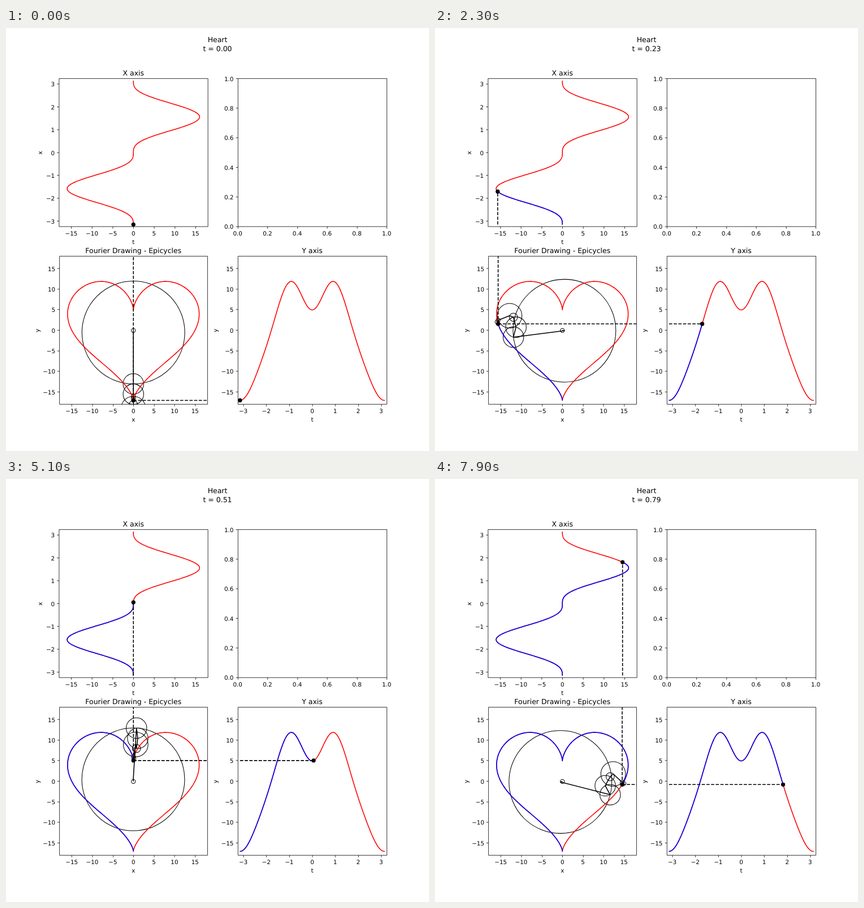
Recreate the animation shown at these times as an HTML page. Size 748 px wide and 748 px high, loop 8 s.

```html
<!DOCTYPE html>
<html lang="en">
<head>
<meta charset="utf-8">
<title>Heart epicycles</title>
<style>
  html, body { margin: 0; width: 100%; height: 100%; overflow: hidden; background: #fff; }
  svg { display: block; width: 100%; height: 100%; }
  text { font: 10.39px "DejaVu Sans", sans-serif; text-anchor: middle; text-rendering: geometricPrecision; }
  .title { font-size: 12.47px; }
  .right { text-anchor: end; }
  path, circle { fill: none; stroke: #000; }
  circle { stroke-width: 1.04; }
  .line { stroke-width: 1.56; stroke-linejoin: round; }
  .red { stroke: #f00; stroke-linecap: square; }
  .blue { stroke: #00f; }
  .dash { stroke-dasharray: 5.766 2.493; }
  .dot { fill: #000; }
  .frame { stroke-width: .8; }
</style>
</head>
<body>
<svg id="stage" viewBox="0 0 748 748"></svg>
<script>
const SIZE = 748, CELL = SIZE / 1000;
const TICK = 3.64, GAP = 7.27;
const LOOP = 8000, STEP = 100;
const PI = Math.PI, EDGE = PI + 0.1;
const stage = document.getElementById('stage');

// Amplitudes along the imaginary axis: [frequency, amplitude]
const terms = [[1, .5], [-1, 12.5], [2, -2.5], [-2, -2.5], [3, 1], [-3, -3], [4, -.5], [-4, -.5]];
const heartX = a => 16 * Math.sin(a) ** 3;
const heartY = a => 13 * Math.cos(a) - 5 * Math.cos(2 * a) - 2 * Math.cos(3 * a) - Math.cos(4 * a);

function add(parent, tag, attrs, content) {
  const el = document.createElementNS('http://www.w3.org/2000/svg', tag);
  for (const key in attrs) el.setAttribute(key, attrs[key]);
  if (content !== undefined) el.textContent = content;
  parent.appendChild(el);
  return el;
}

function label(x, y, content, cls = '') {
  return add(stage, 'text', { x, y, class: cls }, content);
}

// Hairlines sit on the centres of a 1000 cell grid
const snapX = x => (Math.round(x / CELL) + .5) * CELL;
const snapY = y => SIZE - snapX(SIZE - y);
const signed = v => String(v).replace('-', '\u2212');
const range = (from, to, step) =>
  Array.from({ length: Math.round((to - from) / step) + 1 }, (_, i) => from + i * step);

let panelCount = 0;
function makePanel({ left, top, width, height = 261.8, xMax, yMax, xMin = -xMax, yMin = -yMax,
                     xTicks, yTicks, format = signed, title, xName, yName, yNameAt }) {
  const right = left + width, bottom = top + height;
  const px = v => left + (v - xMin) / (xMax - xMin) * width;
  const py = v => bottom - (v - yMin) / (yMax - yMin) * height;

  const id = 'clip' + panelCount++;
  const clip = add(stage, 'clipPath', { id });
  add(clip, 'rect', { x: left, y: top, width, height });
  const plot = add(stage, 'g', { 'clip-path': `url(#${id})` });

  const l = snapX(left), r = snapX(right), t = snapY(top), b = snapY(bottom);
  let frame = `M${l} ${t}H${r}V${b}H${l}Z`;
  for (const v of xTicks) {
    frame += `M${snapX(px(v))} ${b}v${TICK}`;
    label(px(v), bottom + 15.7, format(v));
  }
  for (const v of yTicks) {
    frame += `M${l} ${snapY(py(v))}h${-TICK}`;
    label(left - GAP, py(v) + 3.9, format(v), 'right');
  }
  add(stage, 'path', { d: frame, class: 'frame' });

  if (title) {
    const cx = left + width / 2, cy = top + height / 2;
    label(cx, top - 6.2, title, 'title');
    label(cx, bottom + 30.1, xName);
    add(stage, 'text', { transform: `translate(${yNameAt} ${cy}) rotate(-90)` }, yName);
  }
  return { plot, px, py };
}

function trace(panel, fx, fy, end) {
  const n = Math.max(1, Math.ceil((end + PI) / (2 * PI) * 400));
  let d = '';
  for (let i = 0; i <= n; i++) {
    const a = -PI + (end + PI) * i / n;
    d += (i ? 'L' : 'M') + panel.px(fx(a)).toFixed(2) + ' ' + panel.py(fy(a)).toFixed(2);
  }
  return d;
}

function makeCurve(panel, fx, fy) {
  const line = cls => add(panel.plot, 'path', { class: 'line ' + cls });
  line('red').setAttribute('d', trace(panel, fx, fy, PI));
  const done = line('blue');
  const arm = line('arm');
  const guide = line('dash');
  const dot = add(panel.plot, 'circle', { r: 3.12, class: 'dot' });

  return { arm, draw(a, guidePath) {
    const x = panel.px(fx(a)), y = panel.py(fy(a));
    done.setAttribute('d', a > -PI ? trace(panel, fx, fy, a) : '');
    guide.setAttribute('d', guidePath(x, y));
    dot.setAttribute('cx', x);
    dot.setAttribute('cy', y);
  } };
}

const same = a => a;
const units = range(-3, 3, 1), fives = range(-15, 15, 5), fifths = range(0, 1, .2);
const LEFT = 93.5, RIGHT = 409.71, TOP = 89.76, LOW = 403.92, WIDE = 263.5;

const xPanel = makePanel({ left: LEFT, top: TOP, width: WIDE, xMax: 18, yMax: EDGE,
  xTicks: fives, yTicks: units, title: 'X axis', xName: 't', yName: 'x', yNameAt: 64.4 });
makePanel({ left: RIGHT, top: TOP, width: WIDE, xMin: 0, xMax: 1, yMin: 0, yMax: 1,
  xTicks: fifths, yTicks: fifths, format: v => v.toFixed(1) });
const heartPanel = makePanel({ left: 94.35, top: LOW, width: 261.8, xMax: 18, yMax: 18,
  xTicks: fives, yTicks: fives, title: 'Fourier Drawing - Epicycles', xName: 'x', yName: 'y', yNameAt: 58.7 });
const yPanel = makePanel({ left: RIGHT, top: LOW, width: WIDE, xMax: EDGE, yMax: 18,
  xTicks: units, yTicks: fives, title: 'Y axis', xName: 't', yName: 'y', yNameAt: 374.2 });

const scale = heartPanel.px(1) - heartPanel.px(0);
const circles = terms.map(([, amp]) => add(heartPanel.plot, 'circle', { r: Math.abs(amp) * scale }));
const xCurve = makeCurve(xPanel, heartX, same);
const heart = makeCurve(heartPanel, heartX, heartY);
const yCurve = makeCurve(yPanel, same, heartY);

label(374, 25.3, 'Heart', 'title');
const clock = label(374, 41.3, '', 'title');

function drawArms(a) {
  let x = 0, y = 0;
  let d = `M${heartPanel.px(0)} ${heartPanel.py(0)}`;
  terms.forEach(([freq, amp], i) => {
    circles[i].setAttribute('cx', heartPanel.px(x));
    circles[i].setAttribute('cy', heartPanel.py(y));
    x -= amp * Math.sin(freq * a);
    y += amp * Math.cos(freq * a);
    d += `L${heartPanel.px(x)} ${heartPanel.py(y)}`;
  });
  heart.arm.setAttribute('d', d);
}

let shown = -1;
function render() {
  const step = Math.floor(performance.now() % LOOP / STEP);
  if (step !== shown) {
    shown = step;
    const t = step / 100, a = -PI + 2 * PI * t;
    clock.textContent = 't = ' + t.toFixed(2);
    drawArms(a);
    xCurve.draw(a, (x, y) => `M${x} ${xPanel.py(-PI)}V${y}`);
    yCurve.draw(a, (x, y) => `M${yPanel.px(-PI)} ${y}H${x}`);
    heart.draw(a, (x, y) => `M${x} ${y}V${LOW}M${x} ${y}H${heartPanel.px(18)}`);
  }
  requestAnimationFrame(render);
}
render();
</script>
</body>
</html>
```
